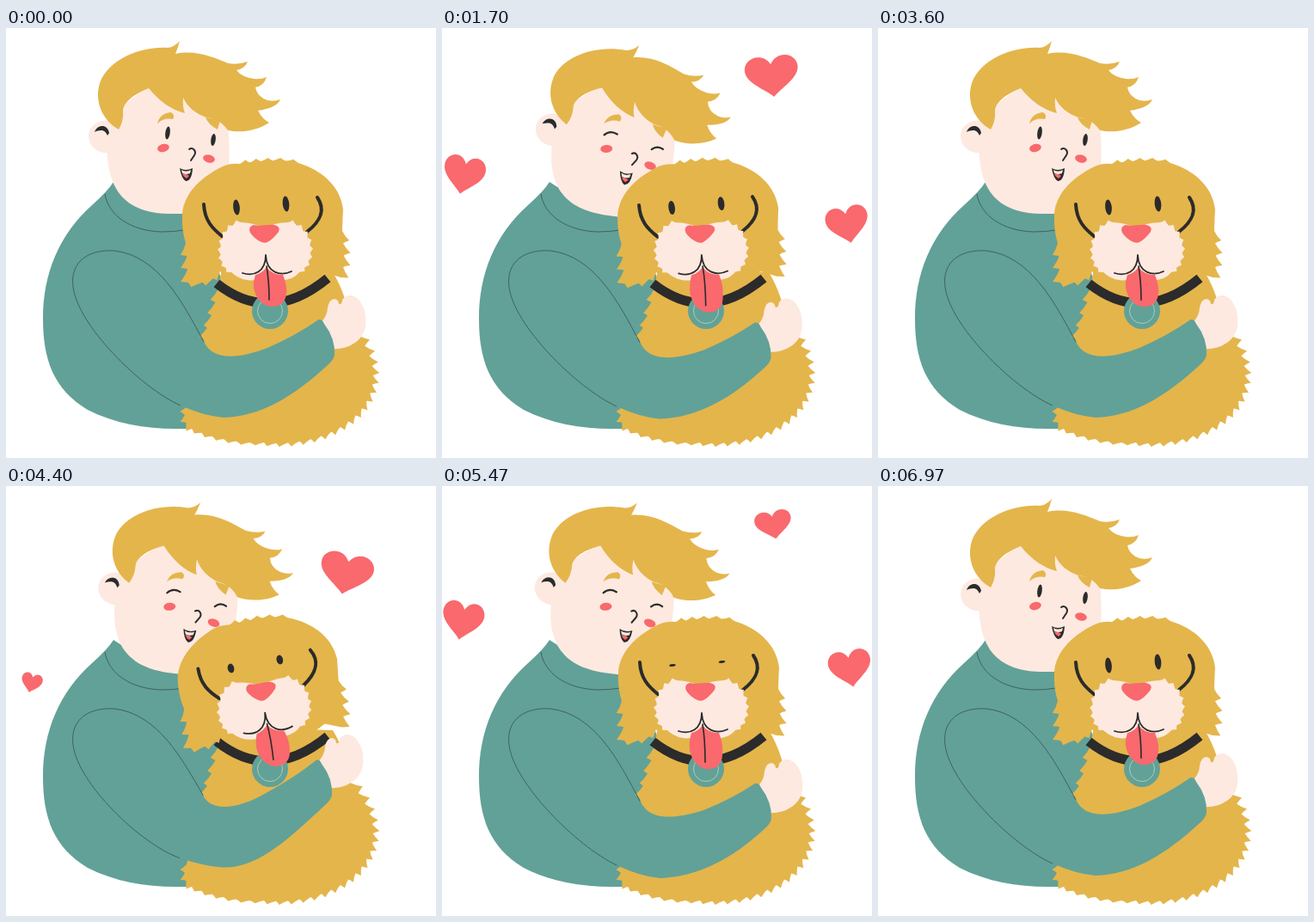
Recreate the animation shown at these times as an HTML page. Size 500x500 px, loop 7.03 s.

```html
<!DOCTYPE html>
<html lang="en">
<head>
<meta charset="utf-8">
<title>Dog hug</title>
<style>
html, body { margin: 0; width: 100%; height: 100%; overflow: hidden; background: #fff; }
svg { display: block; width: 100%; height: 100%; }
.gold { fill: #e4b54b; }
.teal { fill: #62a197; }
.skin { fill: #fde9e0; }
.pink { fill: #f9696d; }
.dark { fill: #2b2b2b; }
.seam { fill: none; stroke: #3f625e; stroke-width: 1; }
.ink { fill: none; stroke: #2b2b2b; stroke-linecap: round; stroke-linejoin: round; }
</style>
</head>
<body>
<svg viewBox="0 0 500 500">
  <defs>
    <path id="heart" d="M0 24C-10 14-31 5-31-9C-31-24-9-30 0-14C9-30 31-24 31-9C31 5 10 14 0 24Z"/>
  </defs>

  <path class="teal" d="M125 179Q118 190 100 206C62 240 43 285 43 338C43 385 55 420 95 444C128 461 168 467 204 466L245 466L250 290L215 205L150 195Z"/>
  <path class="seam" d="M115 193C119 218 145 236 181 237Q195 237 207 235"/>

  <g id="boy">
    <path class="skin" d="M126 109C112 104 97 111 96 125C96 139 109 147 121 145Z"/>
    <path class="skin" d="M137 90L119 120C115 148 119 177 133 194C146 209 163 215 188 216L225 216L256 200Q262 150 258 115L206 78L166 66Z"/>
    <path class="dark" d="M103 121C106 112 118 111 120 122L118 125C115 118 110 118 103 121Z"/>
    <g id="face">
      <ellipse class="pink" cx="183" cy="139.500" rx="7" ry="4.500" transform="rotate(-12 183 140)"/>
      <ellipse class="pink" cx="236" cy="152" rx="7" ry="4.500" transform="rotate(12 236 152)"/>
      <path class="gold" d="M176 111Q179 99 192 98Q197 101 194 106Q184 104 176 111Z"/>
      <path class="gold" d="M232 104Q235 112 246 118L249 107Z"/>
      <g id="open">
        <ellipse class="dark" cx="188" cy="122" rx="2.700" ry="7.500" transform="rotate(8 188 122)"/>
        <ellipse class="dark" cx="241" cy="130" rx="2.700" ry="7" transform="rotate(8 241 130)"/>
      </g>
      <g id="shut" class="ink" stroke-width="2.200">
        <path d="M178 124Q184 117 193 121"/>
        <path d="M235 133Q241 127 248 131"/>
      </g>
      <path class="ink" stroke-width="2" d="M213 141C217 138 222 143 219 148Q217 151 215 154"/>
      <path class="dark" d="M202 163Q209 167 217 163Q216 178 209 178Q204 175 202 163Z"/>
      <path class="skin" d="M204 165Q209 168 215 165L214 169Q209 171 205 169Z"/>
      <path class="pink" d="M205 170Q210 169 213 172L210 175Q207 174 205 170Z"/>
    </g>
    <path class="gold" d="M131 118C112 107 104 87 108 68C114 41 151 21 188 23Q196 22 202 15Q200 23 197 30C221 25 241 34 258 41Q270 43 281 39Q278 47 268 49Q274 57 288 59Q297 60 303 57Q300 67 290 69Q292 80 304 84Q312 86 319 83Q315 93 293 96Q298 106 306 110C291 120 272 122 258 119C250 107 240 105 233 104C221 100 211 92 206 81Q205 92 208 99C192 95 178 85 166 70C150 76 137 86 136 96Q137 108 131 118Z"/>
  </g>

  <path id="body" class="gold"/>
  <path d="M245 297Q307 346 374 291" fill="none" stroke="#2b2b2b" stroke-width="11"/>
  <circle class="teal" cx="307" cy="329" r="21"/>
  <circle cx="307" cy="329" r="14.500" fill="none" stroke="#a9cdbb" stroke-width="1"/>

  <g id="dog">
    <path id="head" class="gold"/>
    <path class="ink" stroke-width="4" d="M230 205C231 224 240 233 251 242"/>
    <path class="ink" stroke-width="4" d="M362 197C373 213 364 226 350 237"/>
    <g id="eyes" class="dark"></g>
    <path id="muzzle" class="skin"/>
    <path class="pink" d="M288 229C295 231 305 228 312 229Q320 231 317 237Q310 246 304 249Q300 251 295 248Q288 244 284 238Q281 231 288 229Z"/>
    <path id="tongue" class="pink"/>
    <path id="crease" class="ink" stroke-width="1.600"/>
    <path class="ink" stroke-width="1.800" d="M275 285C288 289 302 284 302 264C303 285 319 289 332 283"/>
  </g>

  <path id="hand" class="skin" d="M364 345Q374 335 374 325Q376 315 382 315Q387 316 387 321Q391 322 391 316C398 306 412 311 417 329C421 348 416 360 404 367Q394 374 378 373Z"/>
  <path id="arm" class="teal"/>
  <path id="seam" class="seam"/>
  <g id="hearts" class="pink"></g>
</svg>

<script>
const LOOP = 7030, HALF = LOOP / 2, PANT = HALF / 3;
const $ = id => document.getElementById(id);
const set = (el, name, value) => el.setAttribute(name, value);
const smooth = u => { u = Math.min(1, Math.max(0, u)); return u * u * (3 - 2 * u); };

// Rises from a to b, stays, falls from c to d
const pulse = (t, a, b, c, d) => smooth((t - a) / (b - a)) * (1 - smooth((t - c) / (d - c)));

function add(parent, tag, attrs = {}) {
  const el = document.createElementNS('http://www.w3.org/2000/svg', tag);
  for (const k in attrs) set(el, k, attrs[k]);
  return parent.appendChild(el);
}

// Path of n tufts along a cubic curve, drawn clockwise.
// High goes from h0 to h1; lean says where in its step each tip stands.
function fur([ax, ay, bx, by, cx, cy, dx, dy], n, h0, h1, lean) {
  const mix = (a, b, c, d, t) => {
    const s = 1 - t;
    return s * s * s * a + 3 * s * s * t * b + 3 * s * t * t * c + t * t * t * d;
  };
  const at = (t, lift) => {
    const x = mix(ax, bx, cx, dx, t), y = mix(ay, by, cy, dy, t), e = .001;
    const vx = mix(ax, bx, cx, dx, t + e) - x, vy = mix(ay, by, cy, dy, t + e) - y;
    const k = lift * (h0 + (h1 - h0) * t) / Math.hypot(vx, vy);
    return `${(x + vy * k).toFixed(1)} ${(y - vx * k).toFixed(1)} `;
  };
  let d = `L${ax} ${ay}`;
  for (let i = 0; i < n; i++) {
    const step = k => (i + k) / n;
    d += `Q${at(step(lean / 2), .3)}${at(step(lean), 1)}Q${at(step((1 + lean) / 2), .3)}${at(step(1), 0)}`;
  }
  return d;
}

set($('body'), 'd', 'M380 284Q397 312 400 345' +
  fur([400, 345, 470, 425, 390, 490, 300, 482], 19, 9, 4, .75) +
  fur([300, 482, 265, 483, 238, 476, 216, 466], 6, 3, 4, .6) +
  fur([216, 466, 206, 460, 207, 450, 210, 440], 3, 6, 6, .3) +
  fur([228, 362, 236, 345, 243, 325, 247, 303], 4, 4, 7, .1) + 'L251 280Z');

set($('head'), 'd', 'M248 163Q258 157 272 158' +
  fur([272, 158, 290, 156, 315, 151, 340, 157], 5, 4, 3, .6) +
  'C367 165 389 184 392 211Q391 230 391 236' +
  fur([391, 236, 392, 255, 395, 275, 389, 290], 4, 7, 9, .8) +
  'L370 284Q335 306 300 306Q266 302 249 283' +
  fur([249, 283, 243, 293, 230, 298, 212, 296], 3, 4, 5, .8) +
  fur([212, 296, 211, 280, 211, 265, 209, 250], 3, 9, 7, .1) +
  'Q204 235 205 216C207 193 225 175 248 163Z');

set($('muzzle'), 'd', 'M262 284' +
  fur([262, 284, 243, 275, 245, 232, 273, 226], 8, 3, 4, .6) + 'Q285 226 300 232Q315 226 328 226' +
  fur([328, 226, 358, 232, 361, 272, 341, 284], 8, 4, 3, .4) +
  'C330 297 313 294 303 287C292 296 275 296 262 284Z');

const eyes = [[268, 208.5], [325.5, 204.5]].map(([cx, cy]) =>
  add($('eyes'), 'ellipse', { cx, cy, rx: 3.8, transform: `rotate(-6 ${cx} ${cy})` }));

const hearts = [
  { start: 640, life: 1530, x: 390, y: 119, speed: .8, sway: 6.5, tilt: 1, swing: 12, wide: 1, high: 1 },
  { start: 790, life: 1510, x: 28, y: 237, speed: .95, sway: 4.2, tilt: 12, swing: 2, wide: .78, high: .93 },
  { start: 975, life: 1400, x: 472, y: 286, speed: 1, sway: -3.3, tilt: -11, swing: -3, wide: .8, high: .9 }
];
for (const h of hearts) h.el = add($('hearts'), 'use', { href: '#heart' });

function drawHeart(h, t) {
  const age = t - h.start, turn = Math.PI * age / 1500;
  const size = pulse(age, 0, 190, h.life - 340, h.life);
  const x = h.x + h.sway * Math.sin(2 * turn);
  const y = h.y - h.speed * (.09 * age - .000015 * age * age);
  const angle = h.tilt + h.swing * Math.cos(turn);
  set(h.el, 'transform', `translate(${x} ${y}) rotate(${angle}) scale(${h.wide * size} ${h.high * size})`);
}

// Each point follows the wrist by its share k
function drawArm(lift) {
  const p = (x, y, k) => `${x - 3 * lift * k} ${y - 21 * lift * k} `;
  set($('hand'), 'transform', `translate(${-3 * lift} ${-22 * lift})`);
  set($('arm'), 'd',
    `M${p(229, 361, .15)}C${p(237, 388, .4)}${p(270, 385, .4)}${p(304, 372, .7)}` +
    `Q${p(338, 357, .85)}${p(362, 340, .95)}Q${p(367, 337, 1)}${p(370, 344, 1)}` +
    `Q${p(383, 361, 1)}${p(382, 380, 1)}Q${p(381, 386, 1)}${p(374, 392, 1)}` +
    `C${p(335, 428, 1)}${p(296, 452, .35)}${p(253, 453, .45)}` +
    `Q${p(230, 451, .45)}${p(203, 439, .3)}L190 410L210 350Z`);
  set($('seam'), 'd',
    `M${p(203, 439, .3)}C${p(156, 418, .1)}83 345 78 301` +
    `C74 271 97 257 126 259C177 265 205 318 ${p(230, 365, .25)}`);
}

function drawTongue(phase) {
  const tip = 324 + 3.5 * (1 - Math.cos(2 * Math.PI * phase));
  set($('tongue'), 'd', `M290 287Q297 286 303 278Q309 287 322 287C325 295 327 302 326 ${tip - 16}Q325 ${tip} 308 ${tip}Q292 ${tip - 3} 288 ${tip - 22}Q287 297 290 287Z`);
  set($('crease'), 'd', `M303 277Q306 295 306 ${tip - 8}`);
}

function draw(time) {
  const t = time % HALF, phase = t % PANT / PANT;
  const lean = pulse(t, 250, 1070, 1600, 3450);
  const lift = pulse(t, 220, 860, 1100, 1850) - .33 * pulse(t, 1300, 1850, 1851, 3100);
  const tilt = pulse(t, 200, 860, 861, 1950);

  set($('boy'), 'transform', `translate(0 ${-3 * lean}) rotate(${8 * lean} 158 216)`);
  set($('face'), 'transform', `translate(${-2 * lean} 0)`);
  set($('open'), 'visibility', lean < .5 ? 'visible' : 'hidden');
  set($('shut'), 'visibility', lean < .5 ? 'hidden' : 'visible');

  set($('dog'), 'transform', `rotate(${-6 * tilt} 298 272)`);
  const blink = .88 * Math.exp(-(((phase - .64) / .13) ** 2));
  for (const e of eyes) set(e, 'ry', 9 * (1 - blink));

  drawTongue(phase);
  drawArm(lift);
  for (const h of hearts) drawHeart(h, t);
}

const start = performance.now();
function tick() {
  draw((performance.now() - start) % LOOP);
  requestAnimationFrame(tick);
}
draw(0);
requestAnimationFrame(tick);
</script>
</body>
</html>
```
